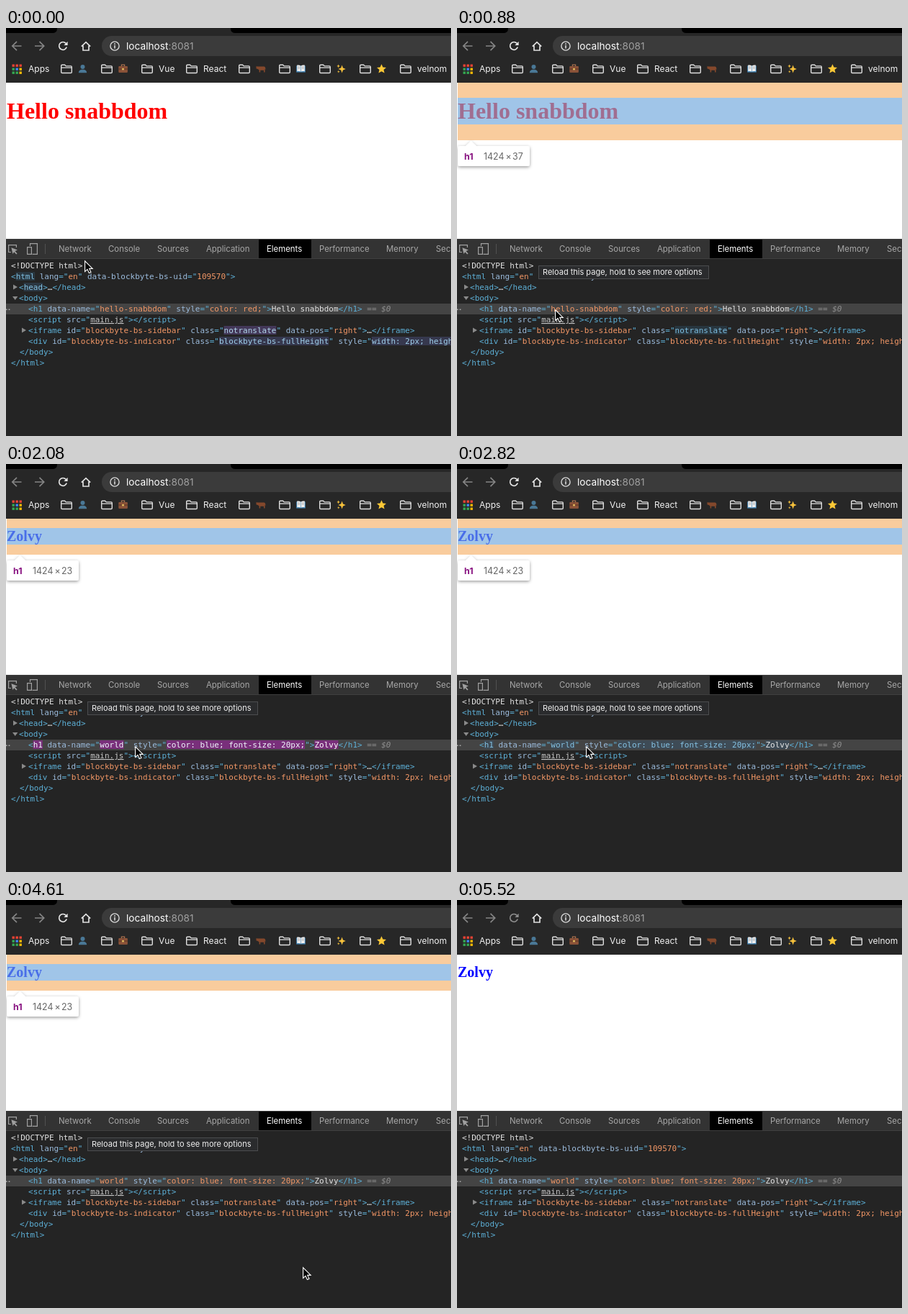
An HTML page for the animation above (5.62 s loop, 618 by 567 pixels).

```html
<!DOCTYPE html>
<html lang="en">
<head>
<meta charset="utf-8">
<title>Virtual DOM demo</title>
<style>
html, body { margin: 0; width: 100%; height: 100%; overflow: hidden; background: #242424; }
svg { display: block; width: 618px; height: 567px; }
text { white-space: pre; }
.ui { font-family: Inter, Roboto, sans-serif; }
.mono { font: 11px "DejaVu Sans Mono", monospace; }
.page { font-family: "Liberation Serif", "Times New Roman", serif; font-weight: bold; }
.t { fill: #5db0d7; }
.a { fill: #9bbbdc; }
.v { fill: #f29766; }
.x { fill: #e4e4e4; }
.l { fill: #c8c8c8; text-decoration: underline; }
.g { fill: #8f8f8f; font-style: italic; }
.line { fill: none; stroke-width: 1.7; }
</style>
</head>
<body>
<svg viewBox="0 0 618 567" xmlns="http://www.w3.org/2000/svg">
  <defs>
    <g id="folder" fill="none" stroke="#dedede" stroke-width="1.4">
      <path d="M.7 2.2Q.7 .7 2 .7H5.6L7.2 2.4H14Q15.3 2.4 15.3 3.7V10.8Q15.3 12 14 12H2Q.7 12 .7 10.8ZM.7 4.6H15.3"/>
    </g>
    <filter id="soft" x="-20%" y="-30%" width="140%" height="180%">
      <feDropShadow dx="0" dy="1.5" stdDeviation="2" flood-opacity=".4"/>
    </filter>
  </defs>

  <rect width="618" height="76" fill="#272727"/>
  <path d="M0 0H71V1Q71 7 64 7H0ZM312 0H618V7H319Q312 7 312 1Z" fill="#000"/>
  <g class="line" stroke="#858585">
    <path d="M21.5 25H9M15 18.8L8.8 25L15 31.2"/>
    <path d="M40 25H52.5M46.5 18.8L52.7 25L46.5 31.2"/>
  </g>
  <g id="reload" stroke="#e6e6e6" fill="#e6e6e6">
    <path class="line" style="fill:none" d="M83.2 21.4A5.4 5.4 0 1 0 84.2 26.6"/>
    <path d="M85.6 18.8V24H80.4Z" stroke="none"/>
  </g>
  <path class="line" stroke="#e0e0e0" d="M104.8 25.6L111 19.6L117.2 25.6M107 24.5V31H115V24.5"/>
  <rect x="133" y="11" width="520" height="28" rx="14" fill="#3b3b3b"/>
  <g fill="#d8d8d8">
    <circle cx="151" cy="25" r="6.1" fill="none" stroke="#d8d8d8" stroke-width="1.4"/>
    <path d="M150.2 24H151.8V28.5H150.2ZM150.2 21.3H151.8V22.9H150.2Z"/>
  </g>
  <text class="ui" x="167" y="30" font-size="13.7" fill="#fff">localhost<tspan fill="#a0a0a0">:8081</tspan></text>
  <g id="bar"></g>
  <g transform="translate(100 50)" fill="#4a7896">
    <circle cx="6.5" cy="4" r="3"/><path d="M.8 12.3Q1 8.6 5 7.8H8Q12 8.6 12.2 12.3Z"/>
  </g>
  <g transform="translate(156 50)">
    <path d="M4.4 3V1.2H8.6V3" fill="none" stroke="#a8714f" stroke-width="1.2"/>
    <rect x=".3" y="3" width="12.6" height="9" rx="1" fill="#8a5238"/>
    <path d="M.3 7H12.9" stroke="#56301f"/><rect x="5" y="6" width="3" height="2.4" fill="#d8b35a"/>
  </g>
  <path transform="translate(347 50)" fill="#84482c" d="M.4 3.2L3 3.4L5 3.6H11.5Q13.6 4 13.4 8L12.6 7V11.6H11V8.8H6.2V11.6H4.6V8.4L2.6 7L.6 6.6Z"/>
  <g transform="translate(403 50)">
    <path d="M.2 2.4H12.8V11.6H.2Z" fill="#3f83b4"/>
    <path d="M1.2 1.6Q4.5 1 6.2 2.4V10.6Q4 9.4 1.2 10.2ZM11.8 1.6Q8.5 1 6.8 2.4V10.6Q9 9.4 11.8 10.2Z" fill="#eee"/>
    <path d="M2.2 4H5.2M2.2 6H5.2M7.8 4H10.8M7.8 6H10.8" stroke="#999" stroke-width=".8"/>
  </g>
  <path transform="translate(459 50)" fill="#f7c23c" d="M7.6 1.6L9 5.6L12.8 7L9 8.4L7.6 12.4L6.2 8.4L2.4 7L6.2 5.6ZM2.6 .4L3.3 2.2L5 2.9L3.3 3.6L2.6 5.4L1.9 3.6L.2 2.9L1.9 2.2ZM2.8 8.8L3.3 10.2L4.6 10.7L3.3 11.2L2.8 12.6L2.3 11.2L1 10.7L2.3 10.2Z"/>
  <path transform="translate(515 50)" fill="#fdc836" d="M6.5 .3L8.4 4.6L13 5L9.5 8.1L10.6 12.6L6.5 10.2L2.4 12.6L3.5 8.1L0 5L4.6 4.6Z"/>

  <rect y="76" width="618" height="217" fill="#fff"/>
  <g id="page"></g>

  <rect y="293" width="618" height="28" fill="#333"/>
  <path d="M0 293.5H618M0 320.5H618" stroke="#3f3f3f"/>
  <rect x="351" y="294" width="73" height="26" fill="#000"/>
  <path d="M54.5 300V314" stroke="#505050"/>
  <g fill="none" stroke="#a0a0a0" stroke-width="1.2">
    <path d="M7 311.5H3.6V301.6H14.4V305"/>
    <path d="M7.4 305.2L16 308.6L12.5 310L15.6 313.4L14.2 314.6L11.2 311.2L9.4 314Z" fill="#a0a0a0" stroke="none"/>
    <path d="M33.5 303V299.6H43.4V314.4H36.5M29.6 304.6H35.4V314.4H29.6Z"/>
  </g>
  <g id="tabs" class="ui" font-size="11.4"></g>
  <g id="code" class="mono"></g>
  <g id="tip">
    <rect x="113.5" y="330.5" width="236" height="18" fill="#2a2b2d" stroke="#4c4d4f"/>
    <text class="ui" x="119" y="343" font-size="11" fill="#f0f0f0">Reload this page, hold to see more options</text>
  </g>
  <path id="cursor" d="M.6 .8V15.4L4 12.3L6.4 17.6L9 16.4L6.7 11.4H11.2Z" fill="#000" stroke="#fff" stroke-width="1.1"/>
</svg>
<script>
const LOOP = 5620, CH = 6.6226, FADE = 1400, SWAP = 2080;
const TIMES = [0, 140, 290, 440, 580, 730, 880, 1030, 1180, 1330, 1480, 2080, 2230, 2380,
  2530, 2820, 3120, 3270, 3420, 4610, 4760, 5060, 5360, 5520];
// time, x, y of the pointer tip
const POINTER = [[0, 109, 323], [140, 107, 400], [290, 105, 396], [730, 107, 397], [880, 136, 391],
  [1030, 146, 390], [1180, 147, 391], [1330, 174, 392], [1480, 179, 392], [4610, 412, 510],
  [4760, 517, 565], [5060, 640, 600]];
const $ = id => document.getElementById(id);
const esc = s => s.replace(/&/g, '&amp;').replace(/</g, '&lt;').replace(/>/g, '&gt;');
const rect = (x, y, w, h, fill) => `<rect x="${x}" y="${y}" width="${w}" height="${h}" fill="${fill}"/>`;
const mix = (a, b, k) => a.map((n, i) => n + (b[i] - n) * k);

function drawBar() {
  const dots = ['#ea4335', '#ea4335', '#ea4335', '#34a853', '#4285f4', '#fbbc05', '#34a853', '#34a853', '#fbbc05'];
  let s = dots.map((c, i) => rect(8.5 + i % 3 * 5, 50.5 + Math.floor(i / 3) * 5, 3.4, 3.4, c)).join('');
  for (const x of [76, 132, 188, 250, 323, 379, 435, 491, 547]) s += `<use href="#folder" x="${x}" y="50.5"/>`;
  for (const [x, name] of [[31, 'Apps'], [212, 'Vue'], [274, 'React'], [571, 'velnom']])
    s += `<text class="ui" x="${x}" y="61" font-size="12" fill="#f2f2f2">${name}</text>`;
  $('bar').innerHTML = s;
  $('tabs').innerHTML = [[73, 'Network'], [142, 'Console'], [210, 'Sources'], [278, 'Application'], [362, 'Elements'],
    [435, 'Performance'], [528, 'Memory'], [597, 'Security']].map(([x, name]) =>
    `<text x="${x}" y="311" fill="${name === 'Elements' ? '#fff' : '#a8a8a8'}">${name}</text>`).join('');
}

// Colours of a node that was updated at the given time
function flash(t, start, cls) {
  const age = t - start;
  if (start === undefined || age < 0 || age >= FADE) return null;
  const k = 1 - Math.pow(1 - Math.min(1, age / (FADE * .8)), 2.2);
  const bg = mix([136, 40, 130, 1], [50, 90, 115, .35], k);
  const ink = mix([255, 255, 255], cls === 'x' ? [228, 228, 228] : [125, 190, 225], k);
  return { bg: `rgba(${bg})`, ink: `rgb(${ink})` };
}

// A part is [class, text, update time]
function row(t, x, y, parts) {
  let col = 0, back = '', spans = '';
  for (const [cls, str, start] of parts) {
    const f = flash(t, start, cls);
    if (f) back += rect(x + col * CH, y - 6, str.length * CH, 12, f.bg);
    spans += `<tspan class="${cls}"${f ? ` style="fill:${f.ink}"` : ''}>${esc(str)}</tspan>`;
    col += str.length;
  }
  return `${back}<text x="${x}" y="${y + 4}">${spans}</text>`;
}

function open(name, attrs = [], start) {
  const parts = [['t', '<'], ['t', name, start]];
  for (const [key, val, when, cls = 'v'] of attrs)
    parts.push(['t', ' '], ['a', key], ['t', '="'], [cls, val, when], ['t', '"']);
  return [...parts, ['t', '>']];
}
const close = name => ['t', `</${name}>`];

function drawCode(t) {
  const done = t >= SWAP, upd = done ? SWAP - 60 : undefined;
  const arrows = '<path d="M10 356.5L16 360L10 363.5ZM9 373H16.4L12.7 378ZM22 416.5L28 420L22 423.5Z" fill="#8a8a8a"/>';
  const h1 = open('h1', [['data-name', done ? 'world' : 'hello-snabbdom', upd],
    ['style', done ? 'color: blue; font-size: 20px;' : 'color: red;', upd]], upd);
  $('code').innerHTML = rect(0, 383, 618, 15, '#444') +
    '<path d="M0 390.5H1.6V392H0ZM3.6 390.5H5.4V392H3.6Z" fill="#aaa"/>' + arrows +
    row(t, 7, 330, [['x', '<!DOCTYPE html>']]) +
    row(t, 7, 345, open('html', [['lang', 'en'], ['data-blockbyte-bs-uid', '109570']], -960)) +
    row(t, 18, 360, [...open('head', [], -820), ['x', '…'], close('head')]) +
    row(t, 18, 375, open('body')) +
    row(t, 31, 390, [...h1, ['x', done ? 'Zolvy' : 'Hello snabbdom', upd], close('h1'), ['g', ' == $0']]) +
    row(t, 31, 405, [...open('script', [['src', 'main.js', undefined, 'l']]), close('script')]) +
    row(t, 31, 420, [...open('iframe', [['id', 'blockbyte-bs-sidebar'], ['class', 'notranslate', -370],
      ['data-pos', 'right']]), ['x', '…'], close('iframe')]) +
    row(t, 31, 435, open('div', [['id', 'blockbyte-bs-indicator'], ['class', 'blockbyte-bs-fullHeight', -520],
      ['style', 'width: 2px; height: 567px;', -520]])) +
    row(t, 19, 450, [close('body')]) +
    row(t, 7, 465, [close('html')]);
}

function drawPage(t) {
  const done = t >= SWAP;
  const [size, base, ink, word] = done ? [20, 107, '#00f', 'Zolvy'] : [32, 126, '#f00', 'Hello snabbdom'];
  let s = `<text class="page" x="1" y="${base}" font-size="${size}" fill="${ink}">${word}</text>`;
  if (t >= 290 && t < 4760) {
    const [top, h, end] = done ? [89, 23, 126] : [97, 37, 156];
    const pad = 'rgba(246,178,107,.66)', y = end + 8;
    s += rect(1, 76, 617, top - 76, pad) + rect(1, top, 617, h, 'rgba(111,168,220,.66)') +
      rect(1, top + h, 617, end - top - h, pad) +
      `<path filter="url(#soft)" fill="#fff" d="M4 ${y}H12L19.5 ${y - 7}L27 ${y}H98Q101 ${y} 101 ${y + 3}V${y + 25}Q101 ${y + 28} 98 ${y + 28}H4Q1 ${y + 28} 1 ${y + 25}V${y + 3}Q1 ${y} 4 ${y}Z"/>` +
      `<g class="ui" font-size="12.4" fill="#666"><text x="10" y="${y + 19}" font-weight="bold" fill="#881280">h1</text>` +
      [[37, '1424'], [67.5, '×'], [77, h]].map(([x, str]) => `<text x="${x}" y="${y + 19}">${str}</text>`).join('') + '</g>';
  }
  $('page').innerHTML = s;
}

function draw(t) {
  drawPage(t);
  drawCode(t);
  $('tip').setAttribute('opacity', t < 140 || t >= 5520 ? 0 : t >= 5360 ? .6 : 1);
  const tone = t >= 5520 ? '#8c8c8c' : '#e6e6e6';
  $('reload').setAttribute('stroke', tone);
  $('reload').setAttribute('fill', tone);
  const [, x, y] = POINTER.filter(p => p[0] <= t).pop();
  $('cursor').setAttribute('transform', `translate(${x} ${y})`);
}

let shown = -1;
const begin = performance.now();
function tick() {
  const now = (performance.now() - begin) % LOOP;
  const t = TIMES.filter(n => n <= now).pop();
  if (t !== shown) draw(shown = t);
  requestAnimationFrame(tick);
}
drawBar();
tick();
</script>
</body>
</html>
```
